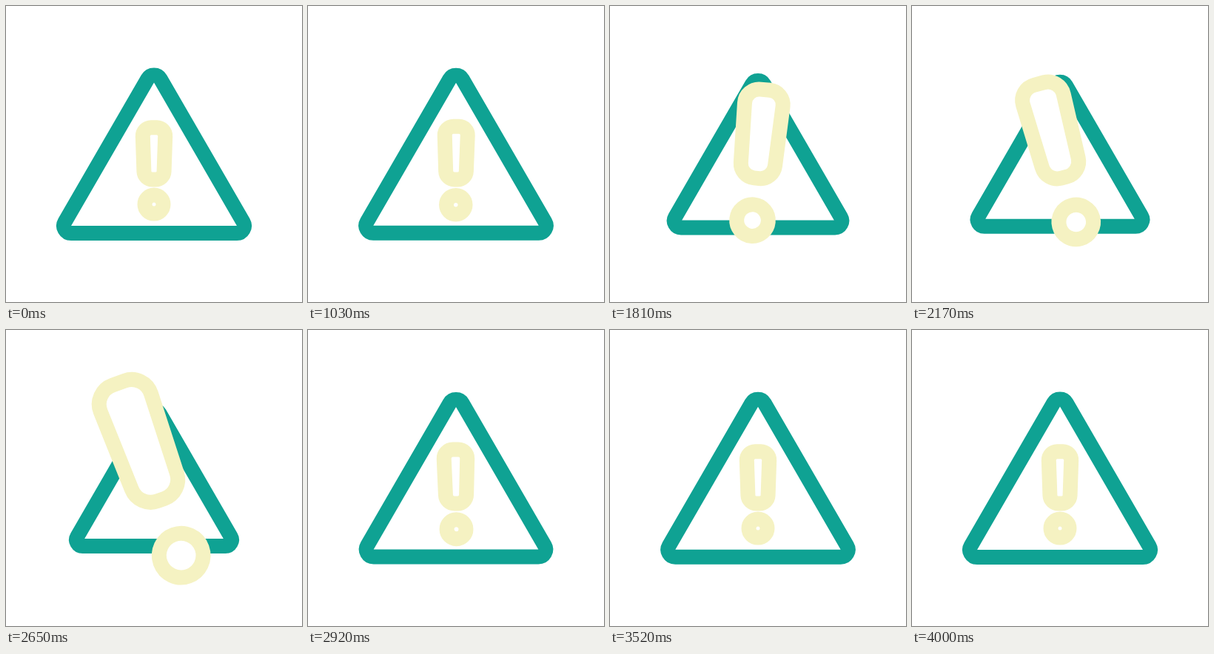
Write an HTML page with a canvas that moves like this. It is 400x400 px and loops after 4060 ms.

```html
<!DOCTYPE html>
<html>
<head>
<meta charset="utf-8">
<style>
  html, body { margin: 0; width: 100%; height: 100%; overflow: hidden; background: #fff; }
  canvas { display: block; width: 400px; height: 400px; }
</style>
</head>
<body>
<canvas width="400" height="400"></canvas>
<script>
const ctx = document.querySelector('canvas').getContext('2d');
const LOOP = 4060, STEP = 30;
const GREEN = '#0fa293', YELLOW = '#f5f2c2';
// Grow, swing from side to side, hold, then spring back to rest
const GROW = 1000, SWING = 1400, HOLD = 2500, SPRING = 2635, REST = 4000;

const clamp = x => Math.min(1, Math.max(0, x));
const progress = (t, from, to) => clamp((t - from) / (to - from));
const ease = u => (1 - Math.cos(Math.PI * u)) / 2;
const spring = (q, damping) => Math.cos(7.33 * q) * (1 - q ** 3) ** damping;

function pose(t) {
  const grow = ease(progress(t, GROW, SWING));
  const swing = progress(t, SWING, HOLD);
  const back = progress(t, SPRING, REST);
  const swell = grow * (1 - 0.58 * Math.sin(Math.PI * swing) ** 2);
  const lean = grow * Math.cos(Math.PI * clamp(1.1 * swing));
  const size = swell * spring(back, 48);
  return {
    triangle: 1 - 0.14 * swell * spring(back, 3),
    mark: 1 + 1.39 * size,
    pivot: 223 - 19.6 * size,
    angle: lean * spring(back, 28) * Math.PI / 9
  };
}

function roundedPath(points, r) {
  const n = points.length, [x0, y0] = points[0], [x1, y1] = points[n - 1];
  ctx.moveTo((x0 + x1) / 2, (y0 + y1) / 2);
  points.forEach((p, i) => ctx.arcTo(...p, ...points[(i + 1) % n], r));
  ctx.closePath();
}

// Builds a path in scaled space, then strokes it with a constant width
function shape(color, y, angle, scale, build) {
  ctx.save();
  ctx.translate(200, y);
  ctx.rotate(angle);
  ctx.scale(scale, scale);
  ctx.beginPath();
  build();
  ctx.restore();
  ctx.fillStyle = '#fff';
  ctx.fill();
  ctx.strokeStyle = color;
  ctx.lineWidth = 20;
  ctx.stroke();
}

function draw(t) {
  const { triangle, mark, pivot, angle } = pose(t);
  ctx.clearRect(0, 0, 400, 400);
  shape(GREEN, 200, 0, triangle, () =>
    roundedPath([[0, -116.5], [129.3, 107], [-129.3, 107]], 10));
  shape(YELLOW, pivot, angle, mark, () =>
    roundedPath([[-15.6, -58.8], [15.6, -58.8], [13.2, 11.6], [-13.2, 11.6]], 11.5));
  shape(YELLOW, pivot, angle, mark, () =>
    ctx.arc(0, 45.1, 12.5, 0, 2 * Math.PI));
}

const origin = performance.now();
function tick() {
  const t = (performance.now() - origin) % LOOP;
  draw(GROW + Math.floor((t - GROW) / STEP) * STEP);
  requestAnimationFrame(tick);
}
tick();
</script>
</body>
</html>
```
